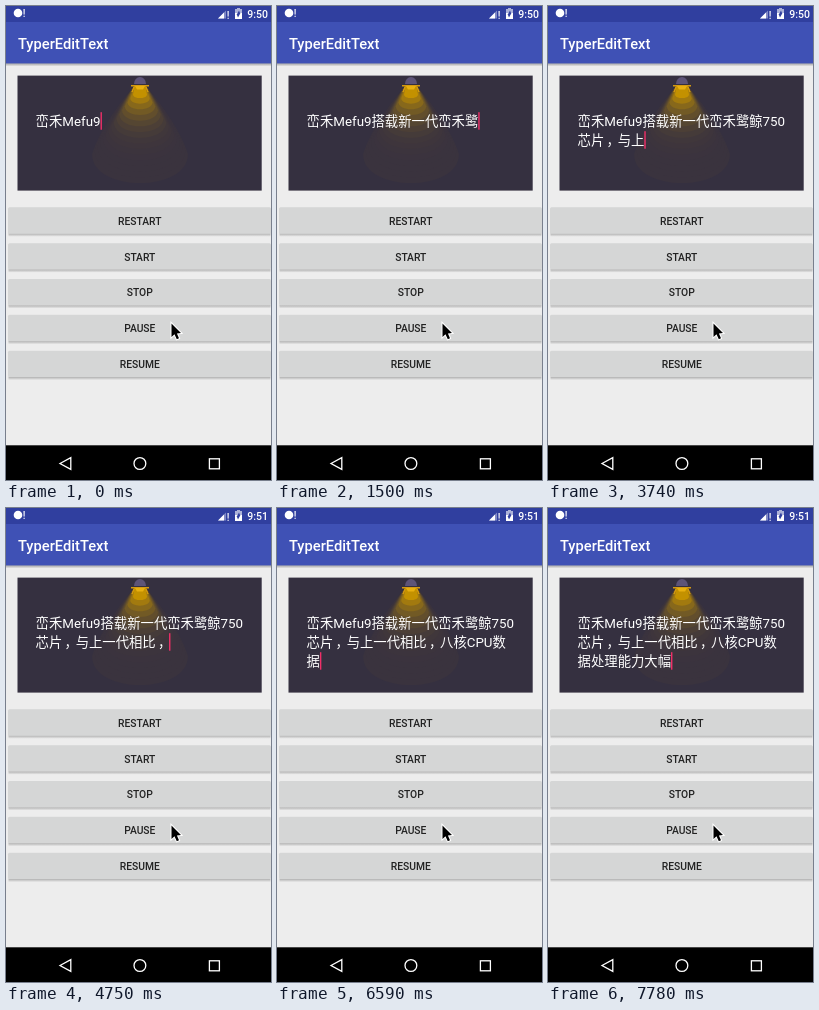
Recreate the animation shown at these times as an HTML page with a canvas. Size 265x474 px, loop 8000 ms.

```html
<!DOCTYPE html>
<html lang="zh-CN">
<head>
<meta charset="utf-8">
<title>TyperEditText</title>
<style>
html, body { margin: 0; width: 100%; height: 100%; overflow: hidden; background: #ededed; }
canvas { display: block; width: 265px; height: 474px; }
</style>
</head>
<body>
<canvas id="stage"></canvas>
<script>
const W = 265, H = 474, LOOP = 8000;
const canvas = document.getElementById('stage');
const ctx = canvas.getContext('2d');
const dpr = window.devicePixelRatio || 1;
canvas.width = W * dpr;
canvas.height = H * dpr;
ctx.scale(dpr, dpr);

const LATIN = 'Roboto, sans-serif';
const BODY = '13.35px Roboto, "Noto Sans CJK SC", sans-serif';
const LINES = ['峦禾Mefu9搭载新一代峦禾鹭鲸750', '芯片，与上一代相比，八核CPU数', '据处理能力大幅'];
const TEXT = LINES.join('');
const TYPED_AT_START = 7, FIRST_KEY = 65, BEAT = 203;
const CLOCK_TICK = 4040, BLINK = 500;
const STATUS = '#303f9f', BAR = '#3f51b5', CARD = '#353040', AMBER = '#d59a10';

function rect(x, y, w, h, color) {
  ctx.fillStyle = color;
  ctx.fillRect(x, y, w, h);
}

function poly(points, fill, stroke, width) {
  ctx.beginPath();
  points.forEach(([x, y]) => ctx.lineTo(x, y));
  ctx.closePath();
  if (stroke) {
    ctx.strokeStyle = stroke;
    ctx.lineWidth = width;
    ctx.stroke();
  }
  if (fill) {
    ctx.fillStyle = fill;
    ctx.fill();
  }
}

function label(text, x, y, size, color, align) {
  ctx.font = `500 ${size}px ${LATIN}`;
  ctx.textAlign = align;
  ctx.fillStyle = color;
  ctx.fillText(text, x, y);
}

function shade(y, h, alpha, x = 0, w = W) {
  const g = ctx.createLinearGradient(0, y, 0, y + h);
  g.addColorStop(0, `rgba(0,0,0,${alpha})`);
  g.addColorStop(1, 'rgba(0,0,0,0)');
  rect(x, y, w, h, g);
}

function statusBar(t) {
  rect(0, 0, W, 16, STATUS);
  ctx.beginPath();
  ctx.arc(12, 7, 4.3, 0, Math.PI * 2);
  ctx.fillStyle = '#fff';
  ctx.fill();
  label('!', 18, 10.5, 10, '#fff', 'center');
  poly([[212, 12.5], [220, 12.5], [220, 4.5]], 'rgba(255,255,255,.4)');
  poly([[212, 12.5], [218, 12.5], [218, 6.5]], '#fff');
  label('!', 222, 12.5, 10, '#fff', 'center');
  rect(231, 2, 3, 1, 'rgba(255,255,255,.6)');
  rect(229, 3, 7, 4, 'rgba(255,255,255,.6)');
  rect(229, 7, 7, 6, '#fff');
  poly([[233, 4.5], [230.8, 8.6], [232, 11.5], [234.2, 7.4]], STATUS);
  label(t < CLOCK_TICK ? '9:50' : '9:51', 262, 11.5, 10.5, '#fff', 'right');
}

function appBar() {
  rect(0, 16, W, 41.5, BAR);
  shade(57.5, 3, 0.3);
  label('TyperEditText', 12, 43, 14.7, '#fff', 'left');
}

function beam(w, bottom) {
  const cx = 134, top = 80, h = bottom - top;
  const side = bottom - h * 0.3, low = side + h * 0.4, bend = top + h * 0.4;
  ctx.beginPath();
  ctx.moveTo(cx - 6, top);
  ctx.quadraticCurveTo(cx - w * 0.8, bend, cx - w, side);
  ctx.bezierCurveTo(cx - w, low, cx + w, low, cx + w, side);
  ctx.quadraticCurveTo(cx + w * 0.8, bend, cx + 6, top);
  ctx.fill();
}

function lamp() {
  const steps = 16;
  for (let i = 0; i < steps; i++) {
    const k = i / (steps - 1), c = k ** 4;
    ctx.fillStyle = `rgb(${58 + 137 * c},${51 + 94 * c},${62 - 62 * c})`;
    beam(48 - 41 * k, 177 - 85 * k);
  }
  ctx.beginPath();
  ctx.ellipse(134, 78, 6, 7, 0, Math.PI, 0);
  ctx.fillStyle = '#5d5478';
  ctx.fill();
  rect(125, 79, 18, 1.5, AMBER);
  poly([[129, 80], [139, 80], [137, 83.5], [131, 83.5]], '#e8b010');
  for (const s of [-1, 1]) poly([[134 + s * 6, 81], [134 + s * 8, 86]], null, AMBER, 1);
}

// One character per beat; a comma holds the next one back two more.
function typing(t) {
  let count = TYPED_AT_START, last = 0, next = FIRST_KEY;
  while (next <= t && count < TEXT.length) {
    last = next;
    next += TEXT[count++] === '，' ? BEAT * 3 : BEAT;
  }
  return { count, last };
}

function typedText(t) {
  const { count, last } = typing(t);
  let left = count, x, y;
  ctx.font = BODY;
  ctx.textAlign = 'left';
  ctx.fillStyle = '#fff';
  for (let i = 0; i < LINES.length && left > 0; i++) {
    x = 29.6;
    y = 120.2 + i * 19;
    for (const ch of LINES[i].slice(0, left)) {
      // The comma sits in the middle of its cell.
      ctx.fillText(ch, x + (ch === '，' ? 2.3 : 0), y);
      x += ctx.measureText(ch).width;
    }
    left -= LINES[i].length;
  }
  if (t - last < BLINK) rect(x, y - 14, 1.4, 17.5, '#f02f68');
}

function button(text, i) {
  const y = 201.3 + i * 35.85;
  shade(y + 26, 3.5, 0.28, 2.5, W - 3);
  ctx.beginPath();
  ctx.roundRect(2, y, W - 2, 26.4, 1.5);
  ctx.fillStyle = '#d5d6d6';
  ctx.fill();
  label(text, 133.8, y + 17.4, 10.3, '#222', 'center');
}

function navBar() {
  rect(0, 439.3, W, 35, '#000');
  poly([[54, 457.5], [64.8, 451.7], [64.8, 463.3]], null, '#fff', 1.3);
  ctx.beginPath();
  ctx.arc(133.9, 457.5, 5.9, 0, Math.PI * 2);
  ctx.stroke();
  ctx.strokeRect(203.4, 452.8, 10, 10);
}

function pointer() {
  poly([[165.5, 317.5], [165.5, 331], [168.5, 328.3], [170.8, 333.3], [173, 332.3],
    [170.9, 327.4], [175, 327]], '#000', '#fff', 2);
}

function draw(t) {
  rect(0, 0, W, H, '#ededed');
  statusBar(t);
  appBar();
  rect(11.5, 69.6, 244.2, 115, CARD);
  lamp();
  typedText(t);
  ['RESTART', 'START', 'STOP', 'PAUSE', 'RESUME'].forEach(button);
  navBar();
  pointer();
}

const start = performance.now();
function tick() {
  draw((performance.now() - start) % LOOP);
  requestAnimationFrame(tick);
}
tick();
</script>
</body>
</html>
```
